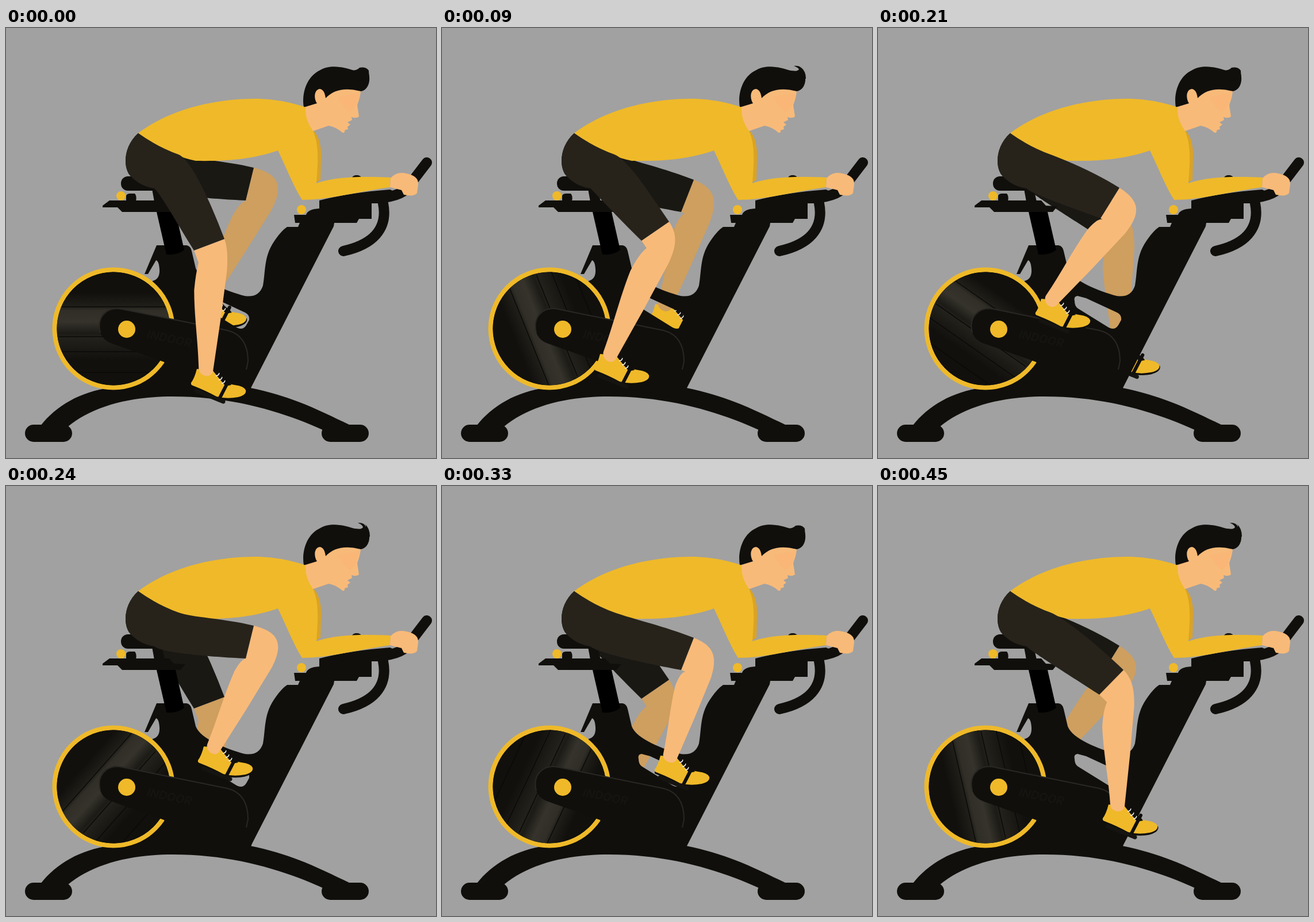
Animation, 748 px wide and 748 px high, one loop 480 ms. Source, as an HTML page:

```html
<!DOCTYPE html>
<html lang="en">
<head>
<meta charset="utf-8">
<title>Indoor cycling</title>
<style>
html, body { margin: 0; width: 100%; height: 100%; overflow: hidden; background: #a1a1a1; }
svg { display: block; width: 100vw; height: 100vh; }
</style>
</head>
<body>
<svg viewBox="0 0 748 748">
  <defs>
    <linearGradient id="sheen" x1="0" y1="0" x2="0" y2="1">
      <stop offset=".22" stop-color="#11100d"/>
      <stop offset=".42" stop-color="#23211b"/>
      <stop offset=".46" stop-color="#1c1b16"/>
      <stop offset=".56" stop-color="#35332b"/>
      <stop offset=".66" stop-color="#302e27"/>
      <stop offset=".7" stop-color="#1f1e18"/>
      <stop offset=".82" stop-color="#11100d"/>
    </linearGradient>
    <g id="shoe">
      <path d="M0 2L0 7Q30 20 50 29Q78 33 92 24Q98 19 96 14Z" fill="#100f0c"/>
      <path d="M10 -24Q6 -8 0 0Q-1 4 3 5Q26 14 44 24Q62 29 82 25Q97 21 95 13Q92 6 76 4Q62 2 54 -6L40 -21Z" fill="#efb929"/>
      <path d="M37 -22Q46 -21 52 -14Q58 -6 67 0L70 4L60 6Q48 -8 37 -22Z" fill="#100f0c"/>
      <path d="M43 -12q5 0 6 -5M48 -5q5 0 6 -5M53 1q5 0 6 -5" fill="none" stroke="#eee" stroke-width="1.5"/>
      <path d="M66 -5L48 30" stroke="#100f0c" stroke-width="6" stroke-linecap="round"/>
      <path d="M9 14L56 33" stroke="#151411" stroke-width="7" stroke-linecap="round"/>
    </g>
  </defs>
  <rect width="748" height="748" fill="#a1a1a1"/>

  <g id="far"></g>

  <g id="bike" fill="#100f0c">
    <rect x="200" y="258" width="76" height="25" rx="12"/>
    <path d="M254 280H271L276 302H258Z"/>
    <path d="M168 312V309L180 300H284L292 309L312 310L304 320H202L194 312Z"/>
    <path d="M209 301V292Q210 288 216 288H224Q228 292 226 301Z"/>
    <circle cx="200" cy="292" r="8" fill="#efb929"/>

    <path d="M60 692C88 656 130 633 180 626H425C500 641 550 668 597 690L580 706L553 700C485 669 397 641 290 641C215 641 150 658 107 694Z"/>
    <rect x="33" y="690" width="82" height="30" rx="15"/>
    <rect x="549" y="690" width="82" height="30" rx="15"/>

    <path fill-rule="evenodd" d="M262 378H314Q321 379 323 388L330 418C338 440 385 458 415 466Q440 470 447 448C452 420 448 395 470 366Q480 352 489 346H508L511 339H503L501 325H522Q525 315 545 314V300H636V332H614L610 339H571L570 345L425 628L300 641L180 635L200 560L255 440Q268 437 267 420Q266 405 261 404L247 428H241Z
      M347 466Q340 467 342 475Q342 484 348 488L398 519Q411 528 418 517L423 508Q424 499 416 495L362 470Z"/>
    <path d="M262 320H295L310 386Q297 396 279 394Z" fill="#000"/>

    <path d="M545 300Q600 286 668 281L690 291Q670 304 620 306Z"/>
    <ellipse cx="610" cy="261" rx="8" ry="5"/>
    <path d="M635 296Q685 296 700 276T732 234M656 305C665 350 637 377 587 388" fill="none" stroke="#100f0c" stroke-width="18" stroke-linecap="round"/>
    <circle cx="514" cy="316" r="8" fill="#efb929"/>

    <g transform="translate(187 523)">
      <circle r="102.5" stroke="#efb929" stroke-width="8"/>
      <g id="wheel">
        <circle r="98.5" fill="url(#sheen)"/>
        <path d="M-62 -76H62M-90 -40H90M-95 -14H95M-90 38H90" stroke="#0b0a08" stroke-width="1.5"/>
      </g>
    </g>

    <path d="M190 487L202 489L385 526Q421 535 421 580V610L300 630L275 581Q230 565 182 548Q162 540 162 516Q164 491 190 487Z"/>
    <path d="M164 530C157 503 175 484 202 489L385 526Q421 535 421 580L418 594" fill="none" stroke="#292824" stroke-width="2"/>
    <circle cx="210" cy="524" r="15" fill="#efb929"/>
    <text transform="translate(244 539) rotate(12)" font-family="Inter, sans-serif" font-size="20" font-style="italic" font-weight="700" fill="#151410">INDOOR</text>
  </g>

  <g id="rider">
    <path d="M532 176Q549 190 548 225L547 264L534 272Z" fill="#dba323"/>
    <path d="M518 134L534 104L590 98L617 108Q617 118 611 134L614 154Q609 158 601 155L602 160L594 164L599 168L594 172L595 176L589 178Q590 183 585 182Q574 172 561 170L532 180L515 150Z" fill="#f8ba79"/>
    <path d="M577 120L615 113L607 138L597 146Q585 135 577 120Z" fill="#f9b676"/>
    <path d="M518 138C514 113 523 84 547 73C566 62 590 69 606 74L630 76C636 93 629 109 617 110C590 103 570 107 556 122Q554 107 546 106C536 107 535 122 541 131Z" fill="#100f0c"/>
    <path id="tuft" fill="#100f0c"/>
    <path d="M230 183C290 137 375 122 440 123Q485 125 521 138Q520 160 534 179C546 205 542 240 540 270C575 258 620 258 669 260L668 277C610 285 560 299 515 299L509 289C496 265 486 240 473 213C430 228 385 232 330 231C295 224 260 205 230 183Z" fill="#efb929"/>
    <path d="M669 261Q680 249 696 253Q718 257 717 272L715 287Q710 294 692 290L688 282L668 277Z" fill="#f8ba79"/>
  </g>

  <g id="near"></g>
</svg>
<script>
const STEP = 30, STEPS = 16;

// Per pose: front and back of the shorts hem, then the heel.
const poses = [
  [380, 367, 327, 387, 322, 617],
  [395, 337, 347, 370, 265, 591],
  [409, 307, 371, 348, 249, 530],
  [420, 278, 387, 331, 274, 495],
  [431, 243, 417, 300, 334, 477],
  [438, 264, 416, 320, 370, 493],
  [441, 288, 409, 337, 386, 552],
  [427, 320, 385, 363, 391, 578]
];
const spin = [[0, 180], [3, 68], [5, -40], [7, -145], [9, -312], [11, -425], [15, -643]];
const lifts = [0, 0, 1, 1, 1, 1, 0, 0, 2, 2, 0, 0, 1, 1, 2, 2];

const $ = id => document.getElementById(id);
const add = (p, d, k) => [p[0] + d[0] * k, p[1] + d[1] * k];
const sub = (a, b) => [a[0] - b[0], a[1] - b[1]];
const unit = v => { const n = Math.hypot(...v); return [v[0] / n, v[1] / n]; };
const dot = (a, b) => a[0] * b[0] + a[1] * b[1];
const s = (...pts) => pts.map(p => p.map(n => n.toFixed(1)).join(" ")).join(" ");

function calfPath(front, back, thigh, ankle) {
  const mid = add(back, sub(front, back), .5);
  const bend = 1 - dot(thigh, unit(sub(ankle, mid)));
  const knee = add(mid, thigh, 15 + 12 * bend);
  const len = Math.hypot(...sub(ankle, knee));
  const dir = unit(sub(ankle, knee));
  const side = [dir[1], -dir[0]];
  const at = (x, y) => add(add(knee, dir, y * len), side, x);
  const notch = add(back, thigh, 20 * Math.max(0, 1.2 - bend));
  const shin = at(27, .14);
  const round = Math.hypot(...sub(front, shin)) * (.3 + .25 * bend);
  return "M" + s(back) + "L" + s(notch) +
    "Q" + s(at(-27, .18), at(-28, .32)) +
    "C" + s(at(-25, .55), at(-16, .75), at(-12, .98)) +
    "C" + s(at(-10, 1.04), at(10, 1.06), at(13, .99)) +
    "L" + s(at(21, .55), shin) +
    "C" + s(add(shin, dir, -round), add(front, thigh, round), front) + "Z";
}

function shortsPath(front, back, thigh, hem) {
  const under = add(thigh, hem, -.2);
  return "M230 183C204 206 203 243 217 258Q235 276 258 279" +
    "C270 290 " + s(add(back, under, -60), back) + "L" + s(front) +
    "C" + s(add(front, thigh, -55)) + " 324 229 300 220Q264 207 230 183Z";
}

// A positive drop narrows and leans the path of the foot.
function leg(pose, skin, cloth, drop) {
  const [fx, fy, bx, by, hx, hy] = poses[pose % 8];
  const front = [fx, fy], back = [bx, by];
  const hem = unit(sub(back, front));
  const thigh = [hem[1], -hem[0]];
  const heel = add([hx, hy], [-.8, 1], drop * (555 - hy));
  return `<use href="#shoe" x="${heel[0]}" y="${heel[1]}"/>` +
    `<path d="${calfPath(front, back, thigh, add(heel, [25, -19], 1))}" fill="${skin}"/>` +
    `<path d="${shortsPath(front, back, thigh, hem)}" fill="${cloth}"/>`;
}

function wheelAngle(n) {
  const i = spin.findLastIndex(k => k[0] <= n);
  const a = spin[i], b = spin[i + 1] || a;
  return a === b ? a[1] : a[1] + (b[1] - a[1]) * (n - a[0]) / (b[0] - a[0]);
}

function tuftPath(lift) {
  if (!lift) return "M600 74Q611 74 615 69Q626 67 631 74L632 90L610 92Z";
  const y = 68 - 2 * lift;
  return `M600 73Q615 78 621 72Q620 ${y + 3} 612 ${y}Q623 ${y - 1} 626 71` +
    `Q627 ${y + 6} 624 ${y + 2}Q633 ${y + 9} 633 88L610 92Z`;
}

let last = -1;
function draw(t) {
  const n = Math.floor(t / STEP) % STEPS;
  if (n !== last) {
    last = n;
    const pose = n >> 1;
    $("far").innerHTML = leg(pose + 4, "#ce9f5f", "#191813", .18);
    $("near").innerHTML = leg(pose, "#f8ba79", "#27231b", 0);
    $("wheel").setAttribute("transform", `rotate(${wheelAngle(n)})`);
    $("tuft").setAttribute("d", tuftPath(lifts[n]));
  }
}

const start = performance.now();
function tick() {
  draw(performance.now() - start);
  requestAnimationFrame(tick);
}
tick();
</script>
</body>
</html>
```
